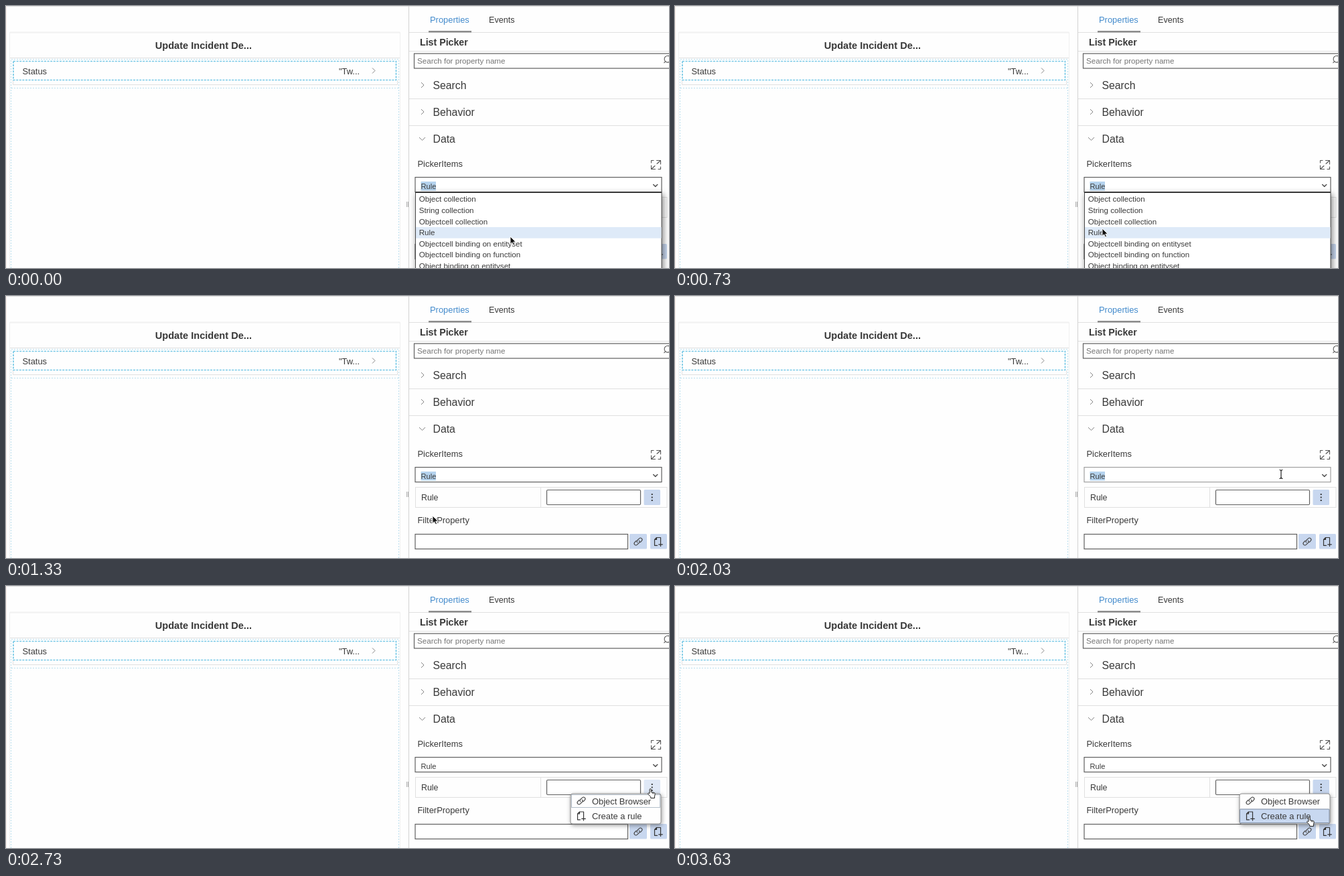
An HTML page that plays this animation: 990x391 px, repeating every 3.8 s.

```html
<!DOCTYPE html>
<html lang="en">
<head>
<meta charset="utf-8">
<title>List picker rule</title>
<style>
  html, body { margin: 0; width: 100%; height: 100%; overflow: hidden; background: #fefefe; }
  svg { display: block; position: absolute; left: 0; top: 0; }
  text { font-family: "Liberation Sans", Arial, sans-serif; font-size: 12.9px; fill: #3a3a3a; }
  .title { font-weight: bold; fill: #383838; font-size: 14.6px; }
  .section { font-size: 15.8px; }
  .small { font-size: 11.6px; }
  .line { fill: none; stroke: #e0e0e0; }
  .icon { fill: none; stroke: #555; stroke-width: 1.1; stroke-linecap: round; stroke-linejoin: round; }
  .chevron { fill: none; stroke: #858585; }
  .field { fill: #fff; stroke: #606060; stroke-width: 1.2; }
  .button { fill: #c8d7ef; }
  .shadow { filter: drop-shadow(1px 2px 3px rgba(0, 0, 0, .38)); }
</style>
</head>
<body>
<svg width="990" height="391" viewBox="0 0 990 391">
  <defs>
    <g id="link" class="icon" style="stroke:#444">
      <path d="M-1.3 1.4A2.5 2.5 0 0 1-1.2-2L1.6-4.6A2.5 2.5 0 0 1 5.2-1.1L3.2 1M1.3-1.4A2.5 2.5 0 0 1 1.2 2L-1.6 4.6A2.5 2.5 0 0 1-5.2 1.1L-3.2-1"/>
    </g>
    <g id="newdoc" class="icon" style="stroke:#333;stroke-width:1.2">
      <path d="M-1 5.8H-5V-3L-2-6H4V1M-2-6V-3H-5M1.2 4.3H6.8M4 1.6V7"/>
    </g>
  </defs>
  <rect width="990" height="391" fill="#fefefe"/>
  <path class="line" d="M0 .5H990"/>
  <path d="M.5 0V391" stroke="#fbeee9"/>

  <!-- page preview -->
  <path d="M6 39.5H588" stroke="#f1f1f1" stroke-width="2"/>
  <path d="M5.5 39V391M588.5 39V391" stroke="#f0f0f0"/>
  <path class="line" d="M6 77.5H588"/>
  <text class="title" x="222.7" y="64">Update Incident De...</text>
  <path d="M7.5 391V79.5H586.5V391M8 122.5H586" fill="none" stroke="#b9deed" stroke-dasharray="2 2"/>
  <path class="line" d="M10.5 111V117.5H584.5V111"/>
  <rect x="11" y="82.5" width="571.5" height="28" fill="#fefefe" stroke="#76c8e6" stroke-width="1.7" stroke-dasharray="3 1.6"/>
  <text x="24.5" y="101.5">Status</text>
  <text x="497" y="101.5">"Tw...</text>
  <path class="chevron" d="M547 92.5L551 96.5L547 100.5"/>

  <!-- property panel -->
  <path d="M601.5 0V391" stroke="#d2d2d2"/>
  <path d="M598.5 292V300M600.5 292V300" stroke="#aaa"/>
  <text x="633" y="25" style="fill:#438bcc">Properties</text>
  <text x="721" y="25" style="font-size:12.6px">Events</text>
  <path class="line" d="M602 39.5H990M602 67.5H990M602 138.5H990M602 178.5H990"/>
  <path d="M631 38.3H695" stroke="#8c8c8c" stroke-width="2.4"/>
  <text class="title" x="618" y="58.5" style="font-size:14.2px">List Picker</text>
  <rect class="field" x="609.5" y="71" width="390" height="22"/>
  <text class="small" x="614" y="86" style="fill:#757575">Search for property name</text>
  <path class="icon" d="M984.5 82.8L982.8 84.6"/><circle class="icon" cx="988" cy="79.2" r="4.9"/>
  <path class="chevron" d="M620 114L624 118L620 122M620 154L624 158L620 162M617 196L621.5 200.5L626 196"/>
  <text class="section" x="637.5" y="123.5">Search</text>
  <text class="section" x="637.5" y="163.5">Behavior</text>
  <text class="section" x="637.5" y="203.5">Data</text>
  <text x="614.5" y="240">PickerItems</text>
  <path class="icon" d="M971.5 230.5H977.5V236M977.5 230.5L972 235.5M969.5 243.5H963.5V238M963.5 243.5L969 238.5M963.5 234V230.5H967M977.5 240V243.5H974"/>

  <rect class="field" id="select" x="611" y="255.6" width="368" height="22"/>
  <rect id="mark" x="619.5" y="262" width="22.5" height="13.5" fill="#b5d3ee"/>
  <text x="619.5" y="273" style="font-size:11.1px">Rule</text>
  <path class="icon" d="M966.7 266.5L969.7 269.5L972.7 266.5" style="stroke-width:1.6"/>

  <rect class="line" x="611.5" y="285.5" width="375.5" height="30"/>
  <path class="line" d="M798.5 286V315"/>
  <text x="620" y="304.7" style="font-size:12.4px">Rule</text>
  <rect class="field" x="807.5" y="289.5" width="140" height="22" rx="1.5"/>
  <rect class="button" id="more" x="952.5" y="289" width="24.5" height="23" rx="1.5"/>
  <path d="M964.7 295v2M964.7 299.5v2M964.7 304v2" stroke="#333" stroke-width="1.9"/>
  <text x="614.5" y="339">FilterProperty</text>
  <rect class="field" x="611" y="355.5" width="317.5" height="22"/>
  <rect class="button" x="931" y="355" width="26" height="22.5" rx="1.5"/>
  <rect class="button" x="962" y="355" width="25" height="22.5" rx="1.5"/>
  <use href="#link" x="944" y="366.5"/>
  <use href="#newdoc" x="973.5" y="366.5"/>

  <g id="list">
    <rect x="611.5" y="278.5" width="367.5" height="130" fill="#fff" stroke="#4a4a4a" style="filter:drop-shadow(2px 3px 5px rgba(0,0,0,.5))"/>
    <path d="M611 278.2H979" stroke="#333" stroke-width="1.6"/>
    <rect x="612" y="330" width="366.5" height="16.6" fill="#deeaf8"/>
  </g>

  <g id="menu">
    <rect class="shadow" x="843" y="310" width="135" height="45" rx="3" fill="#fefefe" stroke="#8b8b8b"/>
    <rect id="focus" x="844.5" y="311.5" width="132" height="19" fill="none" stroke="#b4bfca"/>
    <rect id="hover" x="843.5" y="333" width="133.5" height="20.5" rx="1" fill="#c8d8f0" stroke="#7c8ba0"/>
    <use href="#link" x="859" y="320.5"/>
    <use href="#newdoc" x="858.5" y="343"/>
    <text x="875" y="325.5">Object Browser</text>
    <text x="875" y="347.5">Create a rule</text>
  </g>

  <g id="pointer">
    <path id="arrow" d="M0 0V11.3L2.7 8.9L4.6 13L6.5 12.1L4.7 8.2H8.2Z" fill="#111" stroke="#fff" stroke-width=".9"/>
    <path id="beam" d="M-2.5-6.5Q0-6.5 0-4.5V4.5Q0 6.5-2.5 6.5M2.5-6.5Q0-6.5 0-4.5M0 4.5Q0 6.5 2.5 6.5" fill="none" stroke="#222" stroke-width="1.2"/>
    <g id="hand" fill="#fff" stroke="#222" stroke-linejoin="round">
      <path d="M-.9 7V1.2a1.1 1.1 0 0 1 2.2 0V5l4.6 1c1.2.3 1.5 1 1.3 2.2l-.7 3.2V14H.7v-2L-3.1 8.2C-3.9 7-2.6 6-1.7 6.7Z"/>
      <path d="M3.2 5.6v2.2M5.2 6v2" stroke-width=".8"/>
    </g>
  </g>
</svg>
<script>
  const LOOP = 3800;
  const $ = id => document.getElementById(id);
  const show = (id, on) => $(id).setAttribute("visibility", on ? "inherit" : "hidden");

  // time, x, y
  const path = [
    [0, 753, 344], [30, 753, 344], [600, 638, 332], [830, 638, 332], [1130, 637, 328],
    [1830, 637, 328], [2030, 905, 266], [2330, 962, 302.5], [2860, 962, 302.5],
    [3000, 942.5, 338], [3460, 942.5, 338], [3630, 947, 344.5], [LOOP, 947, 344.5]
  ];
  const shapes = [[0, "arrow"], [1980, "beam"], [2100, "arrow"], [2190, "hand"]];
  const rows = ["Object collection", "String collection", "Objectcell collection", "Rule",
    "Objectcell binding on entityset", "Objectcell binding on function", "Object binding on entityset"];

  rows.forEach((label, i) => {
    const row = document.createElementNS("http://www.w3.org/2000/svg", "text");
    row.setAttribute("class", "small");
    row.setAttribute("x", 616.7);
    row.setAttribute("y", 292.3 + i * 16.6);
    row.textContent = label;
    $("list").append(row);
  });

  const ease = u => u * u * (3 - 2 * u);

  function position(t) {
    const i = path.findIndex(p => p[0] > t);
    const [t0, x0, y0] = path[i - 1], [t1, x1, y1] = path[i];
    const u = ease((t - t0) / (t1 - t0));
    return [x0 + (x1 - x0) * u, y0 + (y1 - y0) * u];
  }

  function draw(now) {
    const t = now % LOOP;
    const shape = shapes.filter(s => s[0] <= t).pop()[1];
    $("pointer").setAttribute("transform", `translate(${position(t)})`);
    for (const id of ["arrow", "beam", "hand"]) show(id, id === shape);
    show("list", t < 1250);
    show("mark", t < 2530);
    show("menu", t >= 2600);
    show("focus", t >= 2600 && t < 2930);
    show("hover", t >= 2930);
    $("select").style.stroke = shape === "beam" ? "#a0a0a0" : "";
    $("more").style.fill = shape === "hand" && t < 2930 ? "#dfe8f6" : "";
  }

  const start = performance.now();
  function tick() {
    draw(performance.now() - start);
    requestAnimationFrame(tick);
  }
  tick();
</script>
</body>
</html>
```
